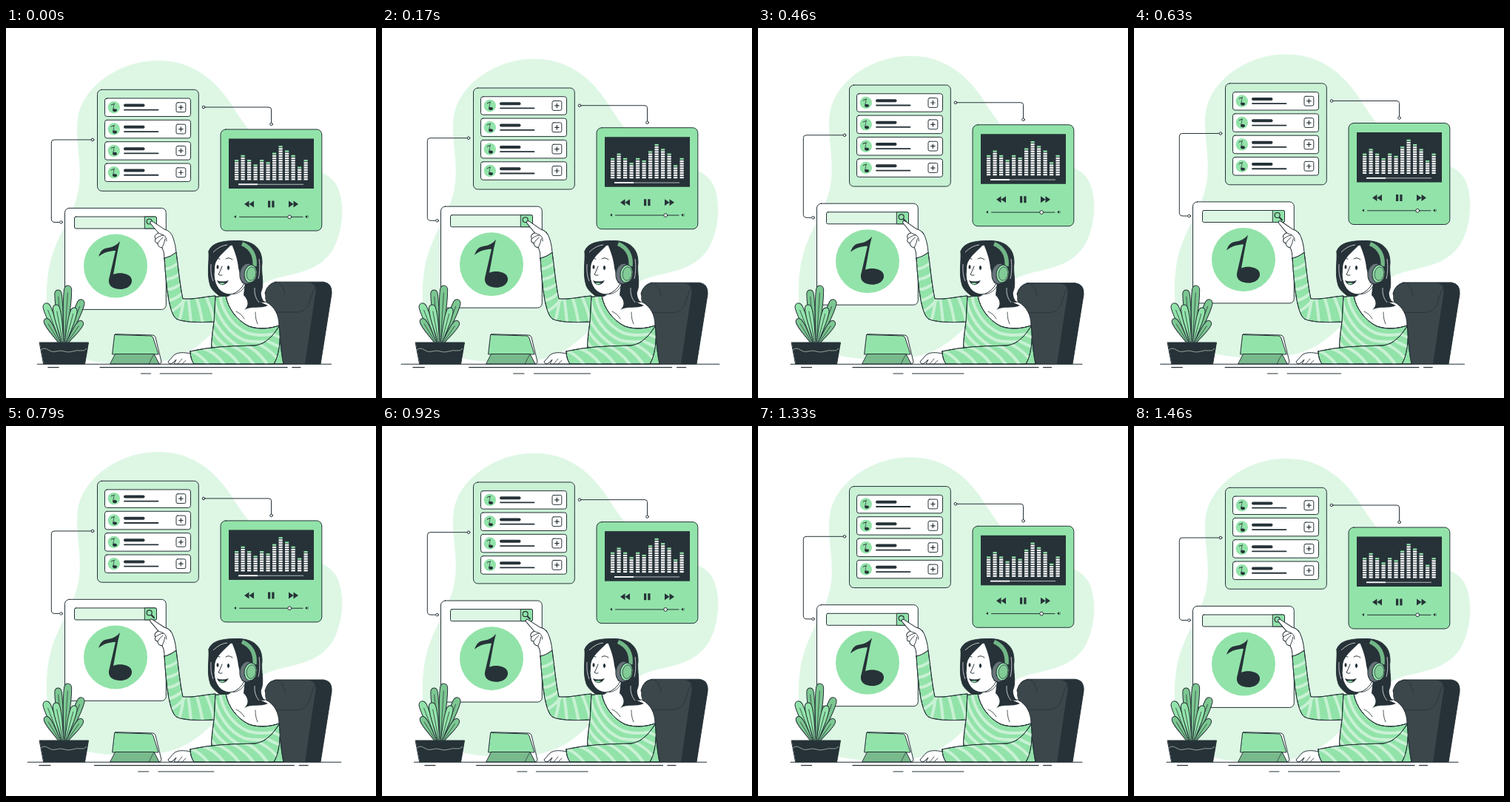
Recreate the animation shown at these times as an HTML page. Size 500 by 500 pixels, loop 1500 ms.

```html
<!DOCTYPE html>
<html lang="en">
<head>
<meta charset="utf-8">
<title>Music search</title>
<style>
html, body { margin: 0; width: 100%; height: 100%; overflow: hidden; background: #fff; }
svg { display: block; width: 100vw; height: 100vh; }
.ink { stroke: #263238; stroke-linecap: round; stroke-linejoin: round; }
.line { fill: none; }
.white { fill: #fff; }
.green { fill: #92e3a9; }
.pale { fill: #c9f1d4; }
.mist { fill: #def7e5; }
.dark { fill: #263238; }
.stripes { fill: none; stroke: #c9f1d4; stroke-width: 4; stroke-linecap: round; }
</style>
</head>
<body>
<svg viewBox="0 0 500 500">
  <defs>
    <path id="note" d="M154 288C150 303 148 318 145 333C152 330 163 331 168 336C174 344 166 353 155 353C144 353 138 348 139 340L148 301C141 301 132 303 125 309C128 300 132 298 138 297C145 296 150 293 154 288Z"/>
    <path id="arm" d="M214 311Q223 309 230 303C233 325 235 348 239 366C255 367 268 363 283 362L281 397C262 398 240 398 230 393C219 384 216 340 214 311Z"/>
    <path id="torso" d="M277 364L297 362C300 379 312 395 328 403C342 408 358 406 369 402C370 418 372 440 375 454H285C274 443 278 420 281 397C277 388 273 375 277 364Z"/>
    <path id="fore" d="M249 437C280 430 305 430 337 429C352 427 362 414 369 403C372 419 369 443 362 454H254Q249 447 249 437Z"/>
    <clipPath id="armClip"><use href="#arm"/></clipPath>
    <clipPath id="torsoClip"><use href="#torso"/></clipPath>
    <clipPath id="foreClip"><use href="#fore"/></clipPath>
  </defs>

  <g id="float">
    <path class="mist" d="M205 44C250 44 279 67 301 98C322 130 340 160 375 177C405 189 432 190 446 211C459 234 456 274 442 299C426 325 400 330 374 336C338 344 323 362 300 388C276 416 250 448 200 452C150 456 101 455 77 432C54 409 52 365 57 331C63 289 86 262 95 231C107 194 92 154 97 122C104 77 156 44 205 44Z"/>
    <g class="ink line">
      <path d="M269 107H355Q358.500 107 358.500 110V128M115 151H65Q61.300 151 61.300 155V258Q61.300 262.500 66 262.500H72"/>
      <g class="white">
        <circle cx="267" cy="107" r="1.800"/><circle cx="358.500" cy="130" r="1.800"/>
        <circle cx="117" cy="151" r="1.800"/><circle cx="74.500" cy="262.500" r="1.800"/>
      </g>
    </g>

    <rect class="ink pale" x="123.500" y="83.300" width="136.800" height="137" rx="6"/>
    <g id="rows"></g>

    <rect class="ink green" x="290" y="137" width="136.800" height="137" rx="7"/>
    <rect class="dark" x="301" y="149.500" width="115" height="67.500"/>
    <g id="bars"></g>
    <path stroke="#b5bcbf" d="M314 211.300H402"/>
    <path stroke="#fff" stroke-width="1.800" d="M314 211.300H340"/>
    <path class="dark" d="M328.500 233.500V242.500L322 238ZM335 233.500V242.500L328.500 238ZM354 233.500h3.200v9h-3.200ZM359.300 233.500h3.200v9h-3.200ZM382 233.500V242.500L388.500 238ZM388.500 233.500V242.500L395 238ZM308 255l3-2v4ZM404 255l3-2v4Z"/>
    <path class="ink line" d="M315.500 255.300H401"/>
    <path class="ink line" stroke-width=".6" d="M408 253.500q1 1.500 0 3"/>
    <circle class="ink white" cx="383.200" cy="255.300" r="2.400"/>

    <rect class="ink white" x="79.500" y="243.400" width="136.800" height="137" rx="6"/>
    <rect class="ink mist" x="92.500" y="255" width="111" height="16" rx="2"/>
    <path class="ink green" d="M187.700 255H201.500Q203.500 255 203.500 257V269Q203.500 271 201.500 271H187.700Z"/>
    <circle class="ink line" cx="193.700" cy="261.500" r="3.500" stroke-width="1.200"/>
    <path class="ink" stroke-width="2" d="M196.800 264.800L200 268"/>
    <circle class="green" cx="148" cy="321.500" r="43"/>
    <use href="#note" class="dark"/>
  </g>

  <g id="chair">
    <path class="ink dark" d="M364 343.200H429Q441 345 440 359L425 454H374L350 358Q353 346 364 343.200Z"/>
    <path fill="#3c474c" d="M352 353Q358 344 368 344H408Q421 345 418 360L404 454H376L350 365Z"/>
    <path class="ink line" stroke-width=".8" d="M364 384H394Q405 383 409 373L416 353Q420 346 430 345M368 344Q376 349 377 360"/>
  </g>

  <g id="woman">
    <!-- back hair -->
    <path class="ink dark" d="M274 302C278 288 299 287.500 314 287.500C336 288 346 299 346 317C344 332 350 346 344 358C343 366 349 371 353 375C338 382 319 384 308 377C296 366 279 358 276 348C271 333 275 316 274 302Z"/>
    <!-- neck and shoulder -->
    <path class="ink white" d="M303 354C306 361 302 362 297 363C300 380 313 396 328 403C343 408 358 406 369 402C369 388 363 376 351 370C339 371 327 366 324 345Z"/>
    <path class="ink line" stroke-width=".8" d="M311 383Q318 386 322 393M337 384Q337 394 340 400M307 360Q318 358 322 350"/>
    <path class="dark" d="M323 343C337 350 333 363 343 370L354 375C343 380 332 375 322 381C330 374 326 366 321 361ZM337 335C349 350 340 360 350 371Q338 371 335 361Z"/>

    <use href="#torso" class="ink green"/>
    <g class="stripes" clip-path="url(#torsoClip)">
      <path d="M289 360C292 385 308 404 326 412C341 417 358 415 373 411M280 361C284 391 303 414 322 422C340 426 358 423 374 420M273 374C281 402 298 422 318 432M272 395C280 414 292 428 306 434M272 416Q280 430 290 438"/>
    </g>
    <use href="#torso" class="ink line"/>

    <use href="#arm" class="ink green"/>
    <g class="stripes" clip-path="url(#armClip)">
      <path d="M213 326Q226 325 235 315M214 340Q228 339 239 329M215 354Q229 353 240 343M217 369Q230 367 241 356M220 384Q230 381 242 367M233 399Q238 384 240 366M250 400Q249 384 246 364M266 400Q263 382 257 362M281 396Q278 380 269 360"/>
    </g>
    <use href="#arm" class="ink line"/>

    <!-- resting hand -->
    <path class="ink white" d="M250 440C239 438 232 438 227 442L219 451Q220 455 225 453L230 448L227 454H255Z"/>
    <path class="ink line" stroke-width=".8" d="M232 454L238 447M238 454L243 449"/>
    <use href="#fore" class="ink green"/>
    <g class="stripes" clip-path="url(#foreClip)">
      <path d="M252 437Q266 444 274 456M267 433Q284 439 296 456M284 430Q303 437 316 456M302 428Q322 436 336 456M320 427Q340 434 354 456M338 426Q354 432 366 446M348 420Q360 427 372 432M357 411Q365 417 373 419"/>
    </g>
    <use href="#fore" class="ink line"/>

    <!-- face -->
    <path class="ink white" d="M300 294C289 300 283 308 282 318L281 334C282 350 290 359 302 360C313 359 321 350 323 341L322 310Q313 303 308 293Z"/>
    <path class="dark" d="M274 303C282 290 294 291 306 291C299 300 286 307 282 321C279 339 284 351 294 359C280 354 275 344 275 330ZM304 290C309 301 313 313 314 324L319 345C329 338 333 319 326 301C322 290 312 288 304 290Z"/>
    <path class="ink line" d="M284 313Q286 310 289 312M297 312Q301 309 306 313M292 322Q289 330 287 333Q289 335 292 334"/>
    <ellipse class="dark" cx="286" cy="323" rx="1.500" ry="2.800"/>
    <ellipse class="dark" cx="300.500" cy="324" rx="1.600" ry="2.900"/>
    <path class="dark" d="M285 341Q292 344 301 341Q297 348 291 347Q287 346 285 341Z"/>
    <path fill="#92e3a9" d="M288 345Q292 343.500 296 345Q292 348 288 345Z"/>
    <path stroke="#fff" stroke-width=".7" fill="none" d="M280 303Q289 294 299 293M277 319Q276 333 280 342M342 312Q344 327 341 339M336 351Q335 363 342 371"/>

    <!-- headphones -->
    <path class="ink line" stroke-width="7.500" d="M320 292Q338 300 336 321"/>
    <path fill="none" stroke="#73b786" stroke-width="5.500" d="M319 291.500Q338 300 336 322"/>
    <ellipse class="ink" fill="#68757a" cx="326" cy="332" rx="10" ry="14" transform="rotate(8 326 332)"/>
    <ellipse class="ink green" cx="330.500" cy="332" rx="8.500" ry="12" transform="rotate(8 330 332)"/>
    <ellipse class="ink" fill="#82cb97" stroke-width=".7" cx="331.500" cy="332" rx="6.300" ry="9.300" transform="rotate(8 331 332)"/>

    <g id="hand">
      <path class="ink white" d="M195 262Q196 260 199 262L214 272Q223 274 226 284Q229 292 230 303Q223 309 214 311Q214 302 211 297Q205 296 205 291Q200 290 202 285Q199 280 206 277L196 265Q194 263 195 262Z"/>
      <path class="ink line" stroke-width=".9" d="M206 277L213 280Q209 280 202 285M212 283Q208 286 205 291M215 285Q214 291 211 297M213 280Q217 282 217 288"/>
    </g>
  </g>

  <g id="plant">
    <g id="leaves"></g>
    <path class="ink dark" d="M45.500 425H111.500L106.500 454H51Z"/>
    <path fill="none" stroke="#92a49a" d="M47 435Q52 431 57 435T68 437T79 437T90 437T101 436T109 433"/>
  </g>

  <g id="tablet">
    <path class="ink white" d="M148 413.700L198 415Q201 415 202 418L210 451Q210 454 206 454L199 440H145Z"/>
    <path class="ink green" d="M147 414.500L196 416Q198 416.500 199 419L206 441H144Z"/>
    <path class="ink" fill="#78ba8b" d="M148 440.500H200L207 454H141Z"/>
    <path class="ink line" stroke-width=".7" d="M200 440.500L193 454"/>
  </g>

  <g id="floor" class="ink line">
    <path d="M44 454.300H438"/>
    <path stroke-width="1.200" d="M58.500 458.700H72.500M128 458.700H379M385.500 458.700H396.500M183 467H196M208.500 467H278"/>
  </g>
</svg>
<script>
const el = id => document.getElementById(id);

const row = i => `<g transform="translate(0 ${i * 29.35})">
  <rect class="ink white" x="133.500" y="95" width="116" height="24.500" rx="3"/>
  <circle class="green" cx="145.800" cy="107.200" r="8.200"/>
  <use href="#note" class="dark" transform="translate(145.800 107.200) scale(.19) translate(-148 -321)"/>
  <path class="ink" stroke-width="4" d="M161 104.500H185.500"/>
  <path class="ink" stroke-width="1.800" d="M160 110.700H205.500"/>
  <rect class="ink white" x="230" y="100.800" width="12.800" height="12.800" rx="2"/>
  <path class="ink" stroke-width="1.200" d="M233.700 107.200h5.400M236.400 104.500v5.400"/>
</g>`;
el('rows').innerHTML = [0, 1, 2, 3].map(row).join('');

// Equalizer columns: number of cells in each
const levels = [9, 11, 9, 7, 9, 8, 12, 15, 13, 11, 6, 9];
el('bars').innerHTML = levels.map((n, i) => Array.from({ length: n }, (_, j) =>
  `<rect x="${309 + i * 8.5}" y="${203.3 - j * 3.15}" width="5.200" height="2.200" fill="${j === n - 1 ? '#92e3a9' : '#fff'}"/>`
).join('')).join('');

// Leaf growing from the soil at b to a rounded tip at (x, y), half width w
function leaf(b, x, y, w, fill) {
  const len = Math.hypot(x - b, 426 - y);
  const angle = Math.atan2(x - b, 426 - y) * 180 / Math.PI;
  return `<g class="ink" transform="translate(${b} 426) rotate(${angle})">
    <path fill="${fill}" d="M-1.500 0C-2 ${-len * 0.35} ${-w * 1.4} ${-len * 0.6} ${-w} ${w - len}
      C${-w * 0.7} ${-len - w * 0.3} ${w * 0.7} ${-len - w * 0.3} ${w} ${w - len}
      C${w * 1.4} ${-len * 0.6} 2 ${-len * 0.35} 1.500 0Z"/>
    <path class="line" stroke-width=".7" d="M0 0V${w * 2 - len}"/></g>`;
}
el('leaves').innerHTML = [
  [79, 84, 348, 5, '#7cc791'], [76, 70, 354, 4.6, '#7cc791'],
  [81, 103, 367, 5, '#7cc791'], [74, 53, 372, 5, '#92e3a9'],
  [77, 67, 374, 4.6, '#92e3a9'], [80, 93, 378, 4.4, '#92e3a9'],
  [73, 53, 393, 4.2, '#7cc791'], [82, 103, 396, 4.2, '#7cc791']
].map(a => leaf(...a)).join('');

const LOOP = 1500, STEPS = 36, REST = 35;

// One smooth swell lasting ten steps
const swell = (k, start) => k > start && k < start + 10 ? Math.sin(Math.PI * (k - start) / 10) ** 2 : 0;

function draw() {
  const t = performance.now() % LOOP;
  const k = Math.floor((t + 5) * STEPS / LOOP) % STEPS;
  const lift = 9.9 * (1 - Math.abs(2 * k / REST - 1));
  const sway = Math.sin(2 * Math.PI * k / STEPS);
  const stretch = 1 + 0.091 * (swell(k, -1) + swell(k, 12.6));
  const move = (id, v) => el(id).setAttribute('transform', v);
  move('float', `translate(0 ${-lift})`);
  move('floor', `translate(241 0) scale(${stretch} 1) translate(-241 0)`);
  move('chair', `translate(0 454) scale(1 ${1 - 0.014 * sway}) translate(0 -454)`);
  move('hand', `rotate(${1.2 * sway} 222 305)`);
  requestAnimationFrame(draw);
}
draw();
</script>
</body>
</html>
```
